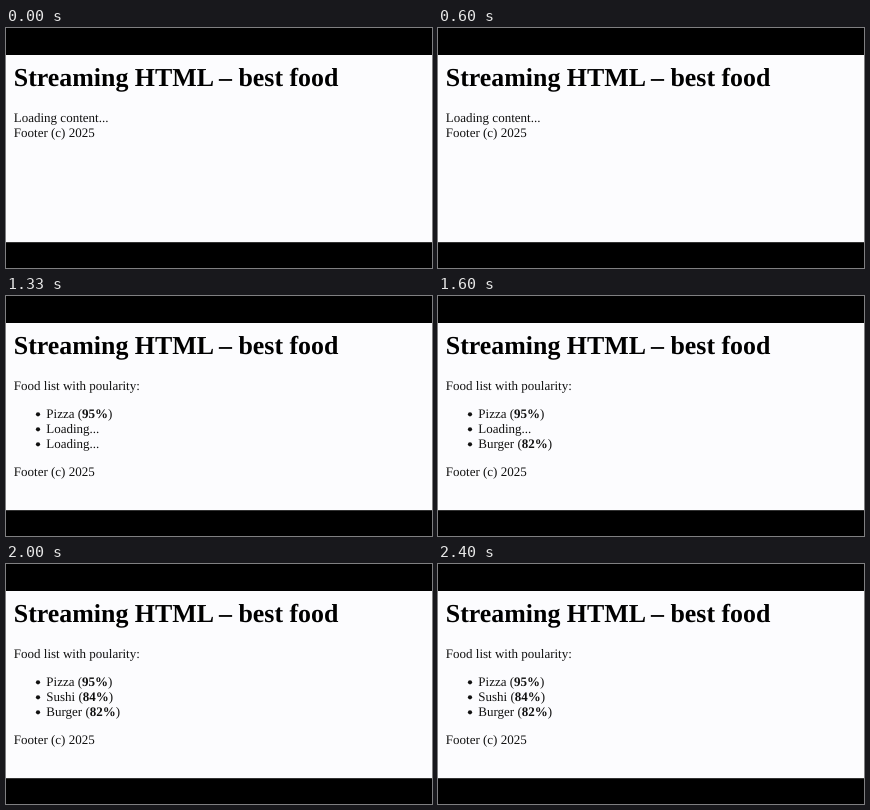
Animation of 426x240 px, one loop 2.47 s. Source, as an HTML page:

```html
<!DOCTYPE html>
<html lang="en">
<head>
<meta charset="utf-8">
<title>Streaming HTML</title>
<style>
  html, body { margin: 0; width: 100%; height: 100%; overflow: hidden; background: #000; }
  svg { display: block; width: 100%; height: 100%; }
  text { font: 13px "Liberation Serif", "Times New Roman", serif; fill: #111; text-rendering: geometricPrecision; }
  .title { font-size: 25.9px; font-weight: bold; fill: #000; }
  .strong { font-weight: bold; }
</style>
</head>
<body>
<svg viewBox="0 0 426 240">
  <rect width="426" height="240" fill="#000"/>
  <rect y="27" width="426" height="187.2" fill="#fcfcfe"/>
  <text class="title" x="7.8" y="58.4">Streaming HTML – best food</text>
  <text id="intro" x="7.8" y="94"></text>
  <g id="list"></g>
  <text id="footer" x="7.8" y="109">Footer (c) 2025</text>
</svg>
<script>
  const LOOP = 2470;
  const LIST_AT = 800;
  const foods = [
    { name: "Pizza", score: "95%", at: 1200 },
    { name: "Sushi", score: "84%", at: 2000 },
    { name: "Burger", score: "82%", at: 1600 }
  ];
  const byId = id => document.getElementById(id);
  const intro = byId("intro"), list = byId("list"), footer = byId("footer");

  function add(parent, tag, attrs = {}) {
    const el = document.createElementNS("http://www.w3.org/2000/svg", tag);
    for (const key in attrs) el.setAttribute(key, attrs[key]);
    return parent.appendChild(el);
  }

  const rows = foods.map((food, i) => {
    const y = 122 + 15 * i;
    add(list, "circle", { cx: 32, cy: y - 3.7, r: 2.1, fill: "#111" });
    const loading = add(list, "text", { x: 40.3, y });
    loading.textContent = "Loading...";
    const ready = add(list, "text", { x: 40.3, y });
    add(ready, "tspan").textContent = food.name + " (";
    add(ready, "tspan", { class: "strong" }).textContent = food.score;
    add(ready, "tspan").textContent = ")";
    return { at: food.at, loading, ready };
  });

  const show = (el, on) => el.setAttribute("display", on ? "inline" : "none");

  function render(t) {
    const listed = t >= LIST_AT;
    intro.textContent = listed ? "Food list with poularity:" : "Loading content...";
    footer.setAttribute("y", listed ? 180 : 109);
    show(list, listed);
    for (const row of rows) {
      show(row.loading, t < row.at);
      show(row.ready, t >= row.at);
    }
  }

  const start = performance.now();
  function tick() {
    render((performance.now() - start) % LOOP);
    requestAnimationFrame(tick);
  }
  tick();
</script>
</body>
</html>
```
